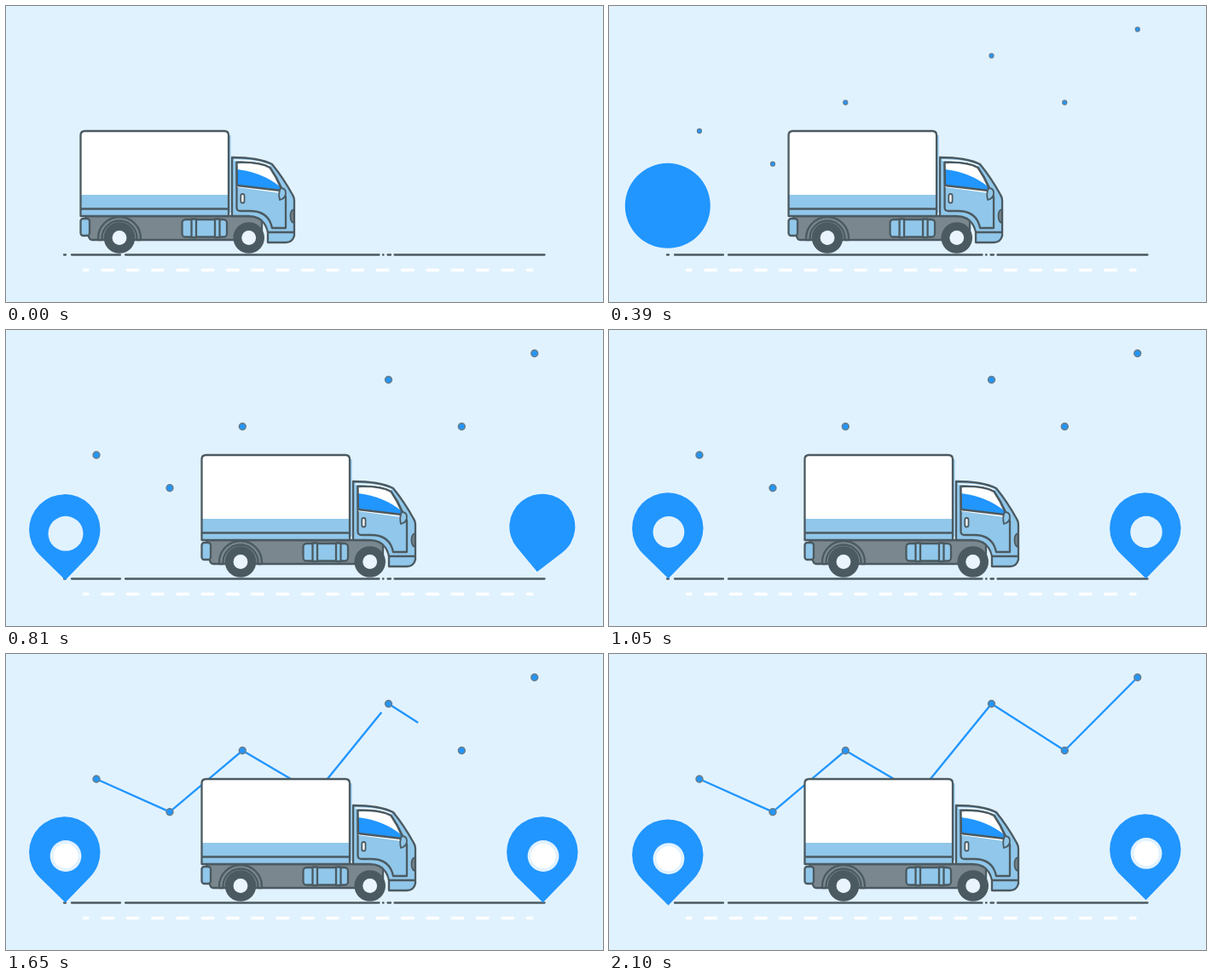
An HTML page for the animation above (2130 ms loop, 700 px wide and 348 px high).

```html
<!DOCTYPE html>
<html lang="en">
<head>
<meta charset="utf-8">
<title>Delivery truck</title>
<style>
  html, body { margin: 0; width: 100%; height: 100%; overflow: hidden; background: #e1f2ff; }
  svg { display: block; width: 700px; height: 348px; }
  .ink { stroke: #4b5a61; stroke-width: 2.3; stroke-linecap: round; stroke-linejoin: round; }
  .sky { fill: #90c7ea; }
  .grey { fill: #7a878e; }
  .dark { fill: #4b5a61; }
  .blue { fill: #2196ff; }
  .pale { fill: #e1f2ff; }
  .white { fill: #fff; }
  .none { fill: none; }
</style>
</head>
<body>
<svg viewBox="0 0 700 348">
  <path class="ink none" d="M68 292.5H70 M77 292.5H134 M140 292.5H437.5 M442 292.5H442.6 M447.5 292.5H451 M455.5 292.5H631.5"/>
  <g stroke="#fff" stroke-width="3.4" stroke-linecap="round">
    <path d="M91.5 310.5H96 M611.5 310.5H617"/>
    <path d="M113 310.5H597" stroke-dasharray="12.6 16.7"/>
  </g>
  <g id="chart"></g>
  <g id="truck">
    <!-- chassis -->
    <path class="ink grey" d="M93 247H300V275H101Q98 275 97 271Z"/>
    <rect class="ink sky" x="87.5" y="250" width="10.5" height="20" rx="3"/>
    <path class="ink grey" d="M108 275V273A25 25 0 0 1 158 273V275H153.500V273A20.500 20.500 0 0 0 112.500 273V275Z"/>
    <rect class="ink sky" x="206.500" y="251" width="52.500" height="20.500" rx="4"/>
    <rect class="ink sky" x="217.500" y="250.500" width="5.500" height="21.500"/>
    <rect class="ink sky" x="245" y="250.500" width="5.500" height="21.500"/>
    <!-- cargo box -->
    <path stroke="#90c7ea" stroke-width="2" d="M262.500 152V243"/>
    <path class="white" d="M87.500 247V152Q87.500 147 92.500 147H256Q261 147 261 152V247Z"/>
    <path class="sky" d="M87.500 222H261V247H87.500Z"/>
    <path class="ink none" d="M87.500 247V152Q87.500 147 92.500 147H256Q261 147 261 152V247Z M87.500 238.500H261"/>
    <!-- cab -->
    <path class="ink sky" d="M265 247V178Q296 178 312 186Q325 202 336 222Q338 225 338 229V270Q336 278 328 278H307V266Q303 247 284 247Z"/>
    <path class="none" stroke="#fff" stroke-width="1.600" d="M267.500 181Q296 181 310 188"/>
    <path class="ink sky" d="M270.500 184Q297 183 309.500 190Q318 202 323 214L328 224V261H312Q308 241 286 241H275Q270.500 241 270.500 237Z"/>
    <path class="white" d="M271 184Q297 183 309.500 190Q317 201 322 213V220L271 213Z"/>
    <path class="blue" d="M271 192Q302 196 322 213V217L271 211Z"/>
    <path class="ink none" d="M270.500 184Q297 183 309.500 190Q317 201 322 213V217L271 211Z"/>
    <path class="ink none" d="M307 266H337.500"/>
    <rect class="ink white" x="275.300" y="221" width="4.200" height="10.500" rx="2" style="stroke-width:1.800"/>
    <path class="ink sky" d="M322 214Q328 214 328 220Q328 226 321 228Q319 220 322 214Z" style="stroke-width:1.800"/>
    <path class="ink grey" d="M337.500 239Q333.500 240 333.500 247T337.500 255Z" style="stroke-width:1.800"/>
    <!-- wheels -->
    <g id="wheels"></g>
  </g>
  <g id="pins"></g>
</svg>
<script>
const LOOP = 2130, STEP = 30;
const POINTS = [[106, 147], [192, 185.7], [277.3, 113.5], [363, 164], [448.5, 58.5], [534.3, 113.5], [619.7, 27.5]];
const $ = id => document.getElementById(id);

function add(parent, tag, attrs) {
  const el = document.createElementNS('http://www.w3.org/2000/svg', tag);
  for (const k in attrs) el.setAttribute(k, attrs[k]);
  return parent.appendChild(el);
}

const clamp = v => Math.max(0, Math.min(1, v));

// Piecewise linear value from [time, value] pairs.
function track(keys, t) {
  if (t <= keys[0][0]) return keys[0][1];
  for (let i = 1; i < keys.length; i++) {
    const [t0, v0] = keys[i - 1], [t1, v1] = keys[i];
    if (t <= t1) return v0 + (v1 - v0) * (t - t0) / (t1 - t0);
  }
  return keys[keys.length - 1][1];
}

for (const cx of [133, 284.7]) {
  add($('wheels'), 'circle', { cx, cy: 272.5, r: 18.3, class: 'dark' });
  add($('wheels'), 'circle', { cx, cy: 272.5, r: 8.4, fill: '#e9f4fd' });
}

const segments = POINTS.slice(1).map(() =>
  add($('chart'), 'path', { stroke: '#2196ff', 'stroke-width': 2.4 }));
const dots = POINTS.map(() =>
  add($('chart'), 'circle', { class: 'blue', stroke: '#687f8e' }));

const pins = [{ x: 68.8, start: 200 }, { x: 628.8, start: 500 }].map(pin => ({
  ...pin,
  body: add($('pins'), 'path', { class: 'blue' }),
  hole: add($('pins'), 'circle', { class: 'pale' }),
  core: add($('pins'), 'circle', { class: 'white' })
}));

const HEAD = [[0, 0], [40, 24], [80, 42], [130, 52], [150, 52.3], [190, 50], [250, 43], [310, 38.5], [370, 40.5], [430, 41.7]];
const TIP_X = [[310, -6], [380, 0], [440, 0.8]];
const TIP_Y = [[190, 30], [310, 53], [400, 59], [610, 59.3]];
const HOLE = [[430, 0], [500, 13], [570, 21], [610, 20.5], [700, 18.4]];
const CORE = [[1000, 0], [1060, 7], [1120, 13], [1150, 14.6]];

// Circle joined to a point by its two tangents.
function teardrop(x, y, r, tx, ty) {
  const d = Math.hypot(tx, ty), dir = Math.atan2(ty, tx);
  const at = a => `${x + r * Math.cos(a)} ${y + r * Math.sin(a)}`;
  if (d <= r) return `M${at(0)}A${r} ${r} 0 0 1 ${at(Math.PI)}A${r} ${r} 0 0 1 ${at(0)}Z`;
  const a = Math.acos(r / d);
  return `M${at(dir + a)}A${r} ${r} 0 1 1 ${at(dir - a)}L${x + tx} ${y + ty}Z`;
}

function drawPin(pin, t) {
  const u = t - pin.start;
  const r = track(HEAD, u);
  const y = 233 + 3.1 * Math.cos(2 * Math.PI * (u - 700) / 600);
  pin.body.setAttribute('d', u > 0 ? teardrop(pin.x, y, r, track(TIP_X, u), track(TIP_Y, u)) : '');
  for (const [el, size] of [[pin.hole, HOLE], [pin.core, CORE]]) {
    el.setAttribute('cx', pin.x + 1.2);
    el.setAttribute('cy', y + 4.5);
    el.setAttribute('r', track(size, u));
  }
}

function draw(t) {
  $('truck').setAttribute('transform', `translate(${142 * clamp(t / 450)} 0)`);
  segments.forEach((el, i) => {
    const [x0, y0] = POINTS[i], [x1, y1] = POINTS[i + 1];
    const p = clamp((t - 1073 - 120 * i) / 240);
    el.setAttribute('d', p ? `M${x0} ${y0}L${x0 + (x1 - x0) * p} ${y0 + (y1 - y0) * p}` : '');
  });
  const grow = clamp((t - 150) / 360);
  dots.forEach((el, i) => {
    el.setAttribute('transform', `translate(${POINTS[i]}) scale(${grow})`);
    el.setAttribute('r', 3.9);
    el.setAttribute('stroke-width', grow ? 1.6 : 0);
  });
  pins.forEach(pin => drawPin(pin, t));
}

const begin = performance.now();
function tick() {
  const t = (performance.now() - begin) % LOOP;
  draw(Math.floor(t / STEP) * STEP);
  requestAnimationFrame(tick);
}
draw(0);
requestAnimationFrame(tick);
</script>
</body>
</html>
```
